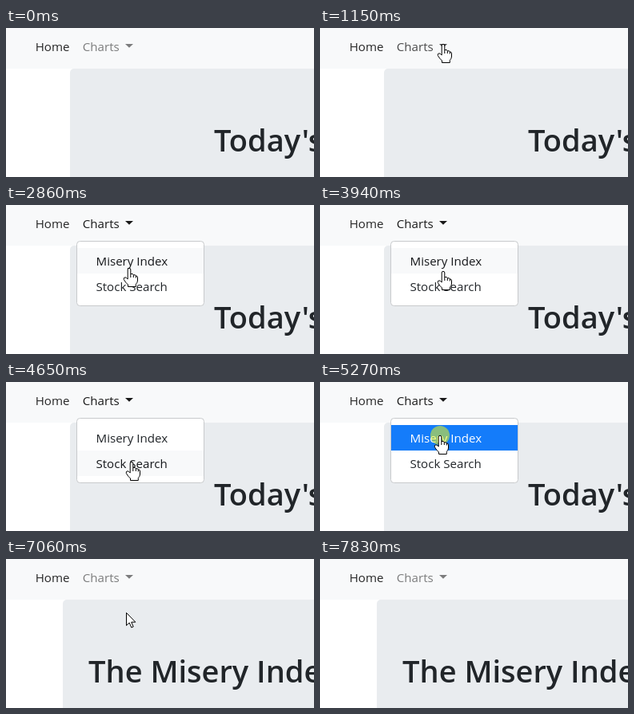
Animation, 385 px wide and 187 px high, one loop 8 s. Source, as an HTML page:

```html
<!DOCTYPE html>
<html lang="en">
<head>
<meta charset="utf-8">
<title>Navigation menu</title>
<style>
  html, body { margin: 0; width: 100%; height: 100%; overflow: hidden; background: #fff; }
  svg { display: block; width: 385px; height: 187px; font: 15.1px "Open Sans", "Noto Sans", sans-serif; }
  #heading { font-size: 38px; font-weight: 600; fill: #212529; }
  .cursor { fill: #fff; stroke: #000; stroke-linejoin: round; }
</style>
</head>
<body>
<svg viewBox="0 0 385 187">
  <rect width="385" height="51" fill="#f8f9fa"/>
  <text x="36.7" y="29" fill-opacity=".85">Home</text>
  <g id="charts">
    <text x="95.8" y="29">Charts</text>
    <path d="M149 20h10l-5 4.8z"/>
  </g>
  <rect id="panel" y="51" width="400" height="200" rx="5" fill="#e9ecef"/>
  <text id="heading" y="155"></text>
  <g id="menu">
    <rect x="88.5" y="45.5" width="159" height="81" rx="4" fill="#fff" stroke="#c8cacc"/>
    <rect id="bar" x="89" width="158" height="32"/>
    <text class="item" x="112.5" y="76">Misery Index</text>
    <text class="item" x="112.5" y="108">Stock Search</text>
  </g>
  <circle id="click" r="12" fill="#ff0" fill-opacity=".5"/>
  <path id="arrow" class="cursor" d="M.5 .5V16.5L4.2 13L6.8 19L9.2 18L6.7 12.2H11.8Z"/>
  <g id="hand" class="cursor">
    <path d="M-1.8 14V2Q-1.8 .3 0 .3T1.8 2V7.5Q5 6.6 5.3 8.8Q8 8 8.3 10Q10.5 9.6 10.5 12V16Q10.3 18.5 8.3 20.5V23.5H-1.5V21Q-4.5 18.5-6.7 14.5Q-7.2 11.8-5 11.8Q-3.6 12-1.8 14Z"/>
    <path d="M1.8 7.5V12M5.3 8.8V12M8.3 10V12.5" fill="none"/>
  </g>
</svg>
<script>
const LOOP = 8000, OPEN = 2090, CLOSE = 5350;
const $ = id => document.getElementById(id);
const items = document.querySelectorAll(".item");
const smooth = p => p * p * (3 - 2 * p);
const late = p => p ** 3.2;

// start, end, steps, target x, target y, easing
const moves = [
  [380, 1150, 11, 154, 20, smooth],
  [2550, 2860, 5, 154, 79, smooth],
  [3940, 4170, 4, 157, 102, smooth],
  [4490, 4950, 7, 150, 67, late],
  [7370, 7830, 7, 325, 190, smooth]
];

function pointer(t) {
  let x = 361, y = 155;
  for (const [start, end, steps, tx, ty, ease] of moves) {
    if (t < start) break;
    const step = Math.floor((t - start) / (end - start) * (steps - 1)) + 1;
    const p = ease(Math.min(1, step / steps));
    x += (tx - x) * p;
    y += (ty - y) * p;
  }
  return [Math.round(x), Math.round(y)];
}

const within = (v, a, b) => v >= a && v < b;
const show = (id, on) => $(id).setAttribute("visibility", on ? "visible" : "hidden");
const place = (id, x, y) => $(id).setAttribute("transform", `translate(${x} ${y})`);

function draw(t) {
  const [x, y] = pointer(t);
  const open = within(t, OPEN, CLOSE);
  const pressed = within(t, 5270, CLOSE);
  const onLink = t < CLOSE && within(x, 88, 167) && within(y, 8, 40);
  const hover = open && within(y, 54, 118) ? Math.floor((y - 54) / 32) : -1;
  const hand = onLink || hover >= 0;

  $("charts").setAttribute("fill-opacity", open ? .9 : onLink ? .7 : .5);

  const loaded = t >= 6280, shift = t >= 7060 ? 8.5 : 0;
  $("panel").setAttribute("x", Math.floor(80 - shift));
  $("heading").textContent = loaded ? "The Misery Index" : "Today's";
  $("heading").setAttribute("x", loaded ? 111.5 - shift : 260);

  $("menu").style.display = open ? "" : "none";
  $("bar").setAttribute("y", 54 + 32 * Math.max(0, hover));
  $("bar").setAttribute("fill", hover < 0 ? "none" : pressed ? "#147cfa" : "#f8f9fa");
  items.forEach((item, i) =>
    item.setAttribute("fill", i !== hover ? "#212529" : pressed ? "#fff" : "#16181b"));

  show("click", pressed || within(t, 2000, OPEN));
  show("arrow", t >= 380 && !hand);
  show("hand", t >= 380 && hand);
  place("click", x, y);
  place("arrow", x, y);
  place("hand", x, y);
}

const begin = performance.now();
function frame() {
  draw((performance.now() - begin) % LOOP);
  requestAnimationFrame(frame);
}
frame();
</script>
</body>
</html>
```
